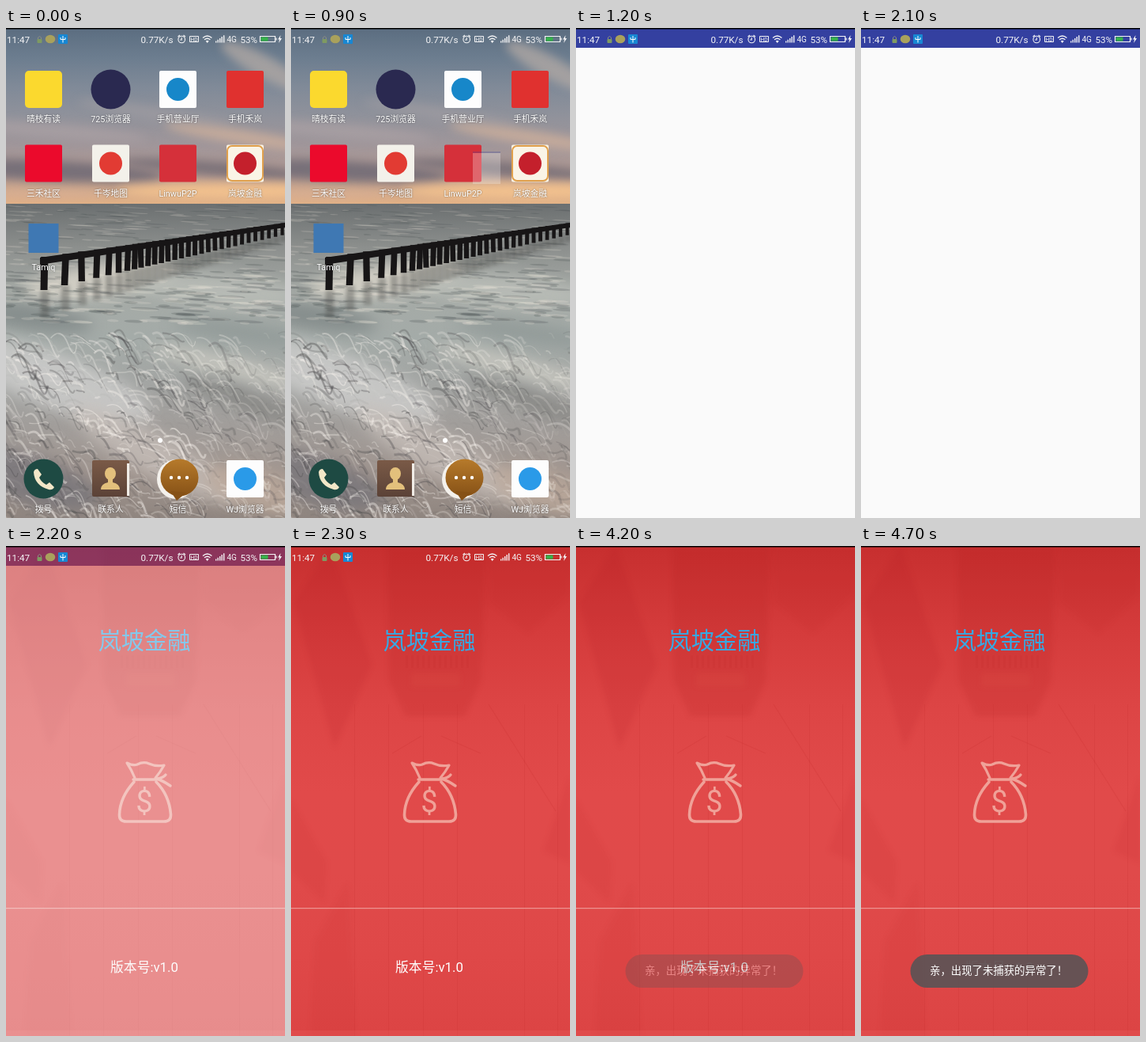
An HTML page with a canvas that plays this animation: 353 by 619 pixels, repeating every 5700 ms.

```html
<!DOCTYPE html>
<html lang="zh">
<head>
<meta charset="utf-8">
<style>
html, body { margin: 0; width: 100%; height: 100%; overflow: hidden; background: #000; }
canvas { display: block; }
</style>
</head>
<body>
<canvas id="stage" width="353" height="619"></canvas>
<script>
const W = 353, H = 619, LOOP = 5700, STEP = 100;
const FONT = 'Roboto, "Noto Sans CJK SC", "Noto Sans CJK", sans-serif';
const stage = document.getElementById('stage').getContext('2d');

let seed = 7;
const random = () => (seed = (seed * 16807) % 2147483647) / 2147483647;
const clamp = v => Math.max(0, Math.min(1, v));

function layer(paint) {
  const canvas = document.createElement('canvas');
  canvas.width = W;
  canvas.height = H;
  paint(canvas.getContext('2d'));
  return canvas;
}

function rect(c, x, y, w, h, color, r = 0) {
  c.fillStyle = color;
  c.beginPath();
  c.roundRect(x, y, w, h, r);
  c.fill();
}

function ellipse(c, x, y, rx, ry, color, angle = 0) {
  c.fillStyle = color;
  c.beginPath();
  c.ellipse(x, y, rx, ry, angle, 0, Math.PI * 2);
  c.fill();
}

function fill(c, d, color) {
  c.fillStyle = color;
  c.fill(new Path2D(d));
}

function stroke(c, d, color, width) {
  c.strokeStyle = color;
  c.lineWidth = width;
  c.stroke(new Path2D(d));
}

function text(c, s, x, y, size, color = '#fff', align = 'left') {
  c.font = `${size}px ${FONT}`;
  c.textAlign = align;
  c.fillStyle = color;
  c.fillText(s, x, y);
}

function gradient(c, y0, y1, ...colors) {
  const g = c.createLinearGradient(0, y0, 0, y1);
  colors.forEach((color, i) => g.addColorStop(i / (colors.length - 1), color));
  return g;
}

function paintSky(c) {
  rect(c, 0, 0, W, 223, gradient(c, 0, 223, '#5b6d80', '#6c7d8f', '#808a98', '#90929b', '#a0969a', '#b59b92', '#e3b185'));
  c.filter = 'blur(6px)';
  ellipse(c, 60, 130, 120, 9, '#ada3a6aa', 0.08);
  ellipse(c, 325, 48, 60, 14, '#b5aba6bb', 0.5);
  ellipse(c, 190, 108, 100, 8, '#a69fa388', 0.15);
  ellipse(c, 300, 138, 100, 9, '#d3b29cbb', 0.15);
  ellipse(c, 50, 180, 150, 13, '#6a6672cc', 0.05);
  ellipse(c, 270, 178, 130, 9, '#706a74cc', 0.08);
  ellipse(c, 290, 206, 150, 10, '#f6c48ee6');
  ellipse(c, 40, 210, 90, 6, '#dcb196aa');
  c.filter = 'none';
}

function paintSea(c) {
  rect(c, 0, 222, W, 397, gradient(c, 222, 619, '#6b6f70', '#8d908e', '#a5aaa6', '#a4aba8', '#a3a5a3', '#a19d9a', '#a0958f', '#8f857f'));
  c.filter = 'blur(9px)';
  ellipse(c, 120, 318, 100, 20, '#dcd8cccc', -0.15);
  ellipse(c, 265, 330, 110, 20, '#c0c4bdaa', 0.1);
  ellipse(c, 30, 365, 80, 16, '#7b8384bb', 0.15);
  ellipse(c, 300, 385, 90, 14, '#8c9594aa', 0.15);
  ellipse(c, 60, 445, 130, 34, '#cfcfcecc', 0.35);
  ellipse(c, 290, 430, 110, 13, '#d0cec6bb', 0.25);
  ellipse(c, 300, 470, 80, 12, '#80807ebb', 0.35);
  ellipse(c, 190, 540, 120, 26, '#c9c0bbbb', 0.5);
  ellipse(c, 320, 585, 70, 26, '#bdaa9dcc', 0.3);
  ellipse(c, 30, 570, 90, 30, '#77757acc', 0.3);
  c.filter = 'none';
  for (let i = 0; i < 420; i++) {
    const y = 224 + random() * 150;
    const tone = random() < 0.5 ? '#fff6e62c' : '#3f474838';
    ellipse(c, random() * W, y, 4 + random() * 16, 0.5 + (y - 222) / 120, tone, 0.05);
  }
  // surf curls down towards the right
  c.filter = 'blur(0.7px)';
  for (let i = 0; i < 900; i++) {
    const x = random() * (W + 30) - 30, depth = random() * 235;
    const y = 385 + depth, size = 4 + random() * 18;
    const tone = random() < 0.6 ? '#fffaf4' : '#4c4a4c';
    c.globalAlpha = random() * (x < 230 ? 0.42 : 0.28);
    stroke(c, `M${x} ${y}q${size * 0.6} ${(random() - 0.7) * size} ${size} ${size * (random() - 0.1)}t${size * 0.5} ${size * random()}`, tone, 1 + random() * 2);
  }
  c.globalAlpha = 1;
  c.filter = 'none';
}

function paintGroyne(c) {
  const dark = '#171516';
  for (let x = 48, gap = 26; x < 356; x += gap, gap = Math.max(8.5, gap * 0.84)) {
    const near = 1 - (x - 48) / 305;
    const top = 246 + near * 43, bottom = 261 + near * 70, w = 4.2 + near * 4.8;
    const lean = (random() - 0.5) * 4 * near;
    c.filter = 'blur(2px)';
    rect(c, x - w / 2, bottom, w + 2, 8 + near * 26, '#4c4b4860');
    c.filter = 'none';
    fill(c, `M${x - w / 2 + lean} ${top}h${w}L${x + w / 2} ${bottom}h${-w}Z`, dark);
  }
  fill(c, 'M43 290L353 246V252L43 299Z', dark);
}

// [column, row, label, tile colour, mark colour]
const APPS = [
  [0, 0, '晴枝有读', '#fbd92e'],
  [1, 0, '725浏览器', '#2a2950'],
  [2, 0, '手机营业厅', '#fdfdfd', '#1787c9'],
  [3, 0, '手机禾岚', '#e0312f'],
  [0, 1, '三禾社区', '#eb0a2c'],
  [1, 1, '千岑地图', '#f3f1ea', '#e23b33'],
  [2, 1, 'LinwuP2P', '#d5303a'],
  [3, 1, '岚坡金融', '#faf4e6', '#c4202c'],
  [0, 2, 'Tamiq', '#3f78b3'],
  [0, 5, '拨号'],
  [1, 5, '联系人'],
  [2, 5, '短信'],
  [3, 5, 'WJ浏览器', '#fdfdfd', '#2a9ae8'],
];

function paintApp(c, [col, row, label, tile, mark]) {
  const x = 47.5 + col * 85, y = row === 5 ? 569.5 : 77.5 + row * 93.5;
  if (tile) {
    if (col === 1 && row === 0) ellipse(c, x, y, 25, 25, tile);
    else if (row === 2) rect(c, x - 19, 247, 38, 37, tile);
    else rect(c, x - 23.5, y - 23.5, 47, 47, tile, col === 0 && row === 0 ? 5 : 2);
  }
  if (col === 3 && row === 1) {
    c.strokeStyle = '#e0a04c';
    c.lineWidth = 2;
    c.beginPath();
    c.roundRect(x - 22.5, y - 22, 45, 44, 6);
    c.stroke();
  }
  if (mark) ellipse(c, x, y, 14.5, 14.5, mark);
  c.shadowColor = '#0008';
  c.shadowBlur = 2;
  text(c, label, x, row === 5 ? 612 : 119 + row * 93.5, 10.8, '#fff', 'center');
  c.shadowBlur = 0;
}

function paintDock(c) {
  ellipse(c, 47.5, 569.5, 25, 25, '#1e4a43');
  fill(c, 'M35 561Q36 557 40 557L45 564L42 568Q45 574 51 577L55 574L61 580Q59 584 54 583Q36 578 35 561Z', '#f3e7c8');
  rect(c, 109, 546, 47, 46, gradient(c, 546, 592, '#7a5a47', '#5b4237'), 2);
  rect(c, 153, 550, 3, 41, '#f0ece6');
  ellipse(c, 132, 563, 7, 8, '#e3c07c');
  fill(c, 'M120 583q0-7 9-9v-6h6v6q9 2 9 9Z', '#e3c07c');
  ellipse(c, 215, 570, 24, 25, '#f4f1ec');
  ellipse(c, 219.5, 568, 24, 23.5, gradient(c, 545, 592, '#b67a2b', '#865116'));
  fill(c, 'M208 585L216 597L228 587Z', '#865116');
  for (const x of [209, 219, 229]) ellipse(c, x, 568, 2.2, 2.2, '#fff');
}

const home = layer(c => {
  paintSky(c);
  paintSea(c);
  paintGroyne(c);
  paintDock(c);
  APPS.forEach(app => paintApp(c, app));
  ellipse(c, 195, 521, 3, 3, '#fff');
});

const status = layer(c => {
  const white = '#f4f4f6';
  text(c, '11:47', 1, 18.5, 11.7, white);
  rect(c, 39.5, 14, 6, 5, '#7f9a62', 1);
  stroke(c, 'M40.5 14v-2q2-3 4 0v2', '#8b8d83', 1);
  ellipse(c, 56, 14, 6.3, 5.3, '#a9a15c');
  rect(c, 66, 8, 12, 12, '#1787d3', 1);
  stroke(c, 'M72 10v8.5M69 12v2.5h6V12', '#fff', 1);
  text(c, '0.77K/s', 170.5, 18.5, 11.7, white);
  stroke(c, 'M226.5 14.5a4.3 4.3 0 1 0-8.6 0a4.3 4.3 0 1 0 8.6 0M222.2 12v3h-2M217.5 11l2.5-2M227 11l-2.5-2', white, 1.1);
  stroke(c, 'M232.5 10.5h11v7h-11Z', white, 1);
  text(c, 'HD', 238, 16.7, 6.5, white, 'center');
  stroke(c, 'M249 12.5q5.7-5 11.4 0M251 14.8q3.7-3.2 7.4 0', white, 1.3);
  fill(c, 'M252.7 16.5q2-1.6 4 0l-2 2.5Z', white);
  for (let i = 0; i < 5; i++) rect(c, 265 + i * 2.5, 16.5 - i * 1.8, 1.4, 2 + i * 1.8, white);
  text(c, '4G', 279.5, 17.5, 10, white);
  text(c, '53%', 296.5, 18.5, 11.6, white);
  stroke(c, 'M321.5 10.5h19v7h-19ZM342 12.5v3', white, 1.2);
  rect(c, 322.5, 11.5, 9, 5, '#35b04a');
  fill(c, 'M347.5 9l-3.5 5.5h2l-1 4.5 4-6h-2.2Z', white);
});

const blank = layer(c => {
  rect(c, 0, 0, W, H, '#fafafa');
  rect(c, 0, 0, W, 25, '#3440a0');
});

function paintBag(c) {
  const pink = '#f0a198';
  c.lineJoin = c.lineCap = 'round';
  stroke(c, 'M163 293Q159 283 153 274Q161 278 166 276Q174 272 181 275Q190 279 200 277Q195 286 189 293', pink, 3.2);
  stroke(c, 'M161 295H191M190 294Q198 296 208 303M191 294Q199 293 202 289', pink, 3.4);
  stroke(c, 'M162 298C150 311 144 325 143.5 339Q143 348 152 348H200Q209 348 208.5 339C207 322 200 308 190 298', pink, 3.6);
  text(c, '$', 175, 336, 38, pink, 'center');
}

const splash = layer(c => {
  rect(c, 0, 0, W, H, gradient(c, 0, H, '#c72f2f', '#d43b3b', '#dd4545', '#e14a4a', '#e04a4a', '#df4848', '#dc4444'));
  c.filter = 'blur(3px)';
  fill(c, 'M122 0H246L240 170L220 215H145L124 170Z', '#b01c2026');
  fill(c, 'M50 0L4 72L55 255L102 150Z', '#b01c2020');
  fill(c, 'M252 0H353V60L300 110L250 70Z', '#b01c2014');
  fill(c, 'M0 320L45 400L42 450L0 410Z', '#b01c2014');
  fill(c, 'M353 290L320 385L353 400Z', '#b01c2018');
  fill(c, 'M72 425L30 500L25 619H82Z', '#b01c2012');
  rect(c, 152, 160, 62, 18, '#f0706014');
  c.filter = 'none';
  for (const x of [80, 123, 167, 210, 295, 337]) rect(c, x, 200, 1, H, '#b0202022');
  for (let x = 145; x < 225; x += 7) rect(c, x, 138, 3, 16, '#b0202014');
  stroke(c, 'M250 200L335 335M128 262L165 240M190 240L240 262', '#b0202022', 1.2);
  rect(c, 0, 457, W, 1.3, '#ec9390');
  rect(c, 0, 612, W, 7, '#e8606044');
  text(c, '岚坡金融', 175, 129.5, 29.2, '#35a9e4', 'center');
  paintBag(c);
  text(c, '版本号:v1.0', 175, 538, 16.8, '#fff', 'center');
});

const toast = layer(c => {
  rect(c, 62.5, 516, 225, 42, '#615355f5', 21);
  text(c, '亲，出现了未捕获的异常了！', 87, 541, 13.4);
});

function show(image, alpha = 1, ...box) {
  stage.globalAlpha = alpha;
  stage.drawImage(image, ...(box.length ? box : [0, 0]));
  stage.globalAlpha = 1;
}

// The launched window grows out of its icon
function showOpening(p) {
  const w = W * p ** 1.66, h = H * p ** 1.95;
  const x = 302 - 125.5 * p ** 0.6, y = 170 + 139.5 * p ** 2.2;
  show(blank, p * 1.07, ...[x - w / 2, y - h / 2, w, h].map(Math.round));
}

function draw(t) {
  if (t < 1200) {
    show(home);
    if (t >= 900) showOpening((t - 800) / 400);
  } else {
    show(blank);
    if (t >= 2200) show(splash, t < 2300 ? 0.6 : 1);
  }
  show(status, clamp((2600 - t) / 300));
  if (t >= 4100) show(toast, clamp((t - 4000) / 600));
  rect(stage, 0, 0, W, 1.5, '#000');
}

function tick(now) {
  draw(Math.floor((now % LOOP) / STEP) * STEP);
  requestAnimationFrame(tick);
}
requestAnimationFrame(tick);
</script>
</body>
</html>
```
